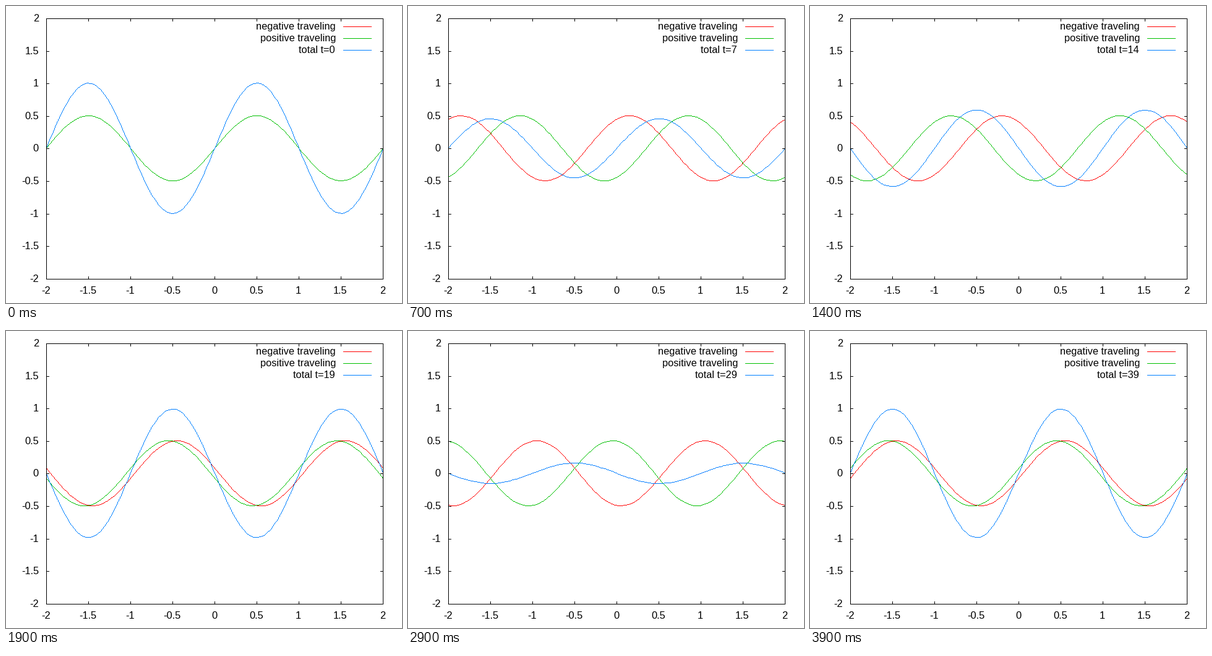
These frames come from a looping animation (640 by 480 pixels, 4000 ms). A matplotlib script:

```python
import numpy as np
import matplotlib.pyplot as plt
from matplotlib.animation import FuncAnimation

W, H, DPI = 640, 480, 100
LEFT, RIGHT, TOP, BOTTOM = 65, 609, 20, 441
RED, GREEN, BLUE = "#ff0000", "#00c000", "#0080ff"
FRAMES, PERIOD = 40, 40

plt.rcParams.update({
    "font.family": "Liberation Sans",
    "font.size": 16.4 * 72 / DPI,
    "text.hinting": "force_autohint",
    "text.hinting_factor": 8,
})

fig = plt.figure(figsize=(W / DPI, H / DPI), dpi=DPI, facecolor="white")
ax = fig.add_axes([0, 0, 1, 1])
ax.set_xlim(0, W)
ax.set_ylim(H, 0)
ax.axis("off")


def col(x):
    return np.floor(LEFT + (x + 2) * (RIGHT - LEFT) / 4 + 0.5)


def row(y):
    return np.ceil(BOTTOM - (y + 2) * (BOTTOM - TOP) / 4 - 0.5)


def stroke(x0, y0, x1, y1, color="black"):
    """One-pixel line from pixel (x0, y0) to pixel (x1, y1)."""
    ax.plot([x0 + 0.5, x1 + 0.5], [y0 + 0.5, y1 + 0.5], color=color,
            lw=72 / DPI, antialiased=False, snap=False,
            solid_capstyle="projecting", zorder=5)


def label(x, y, text, align):
    return ax.text(x, y, text, ha=align, va="baseline", color="black")


def pixel_path(px, py):
    """Pixels of a jagged polyline through whole-pixel points."""
    xs, ys = [], []
    for x0, y0, x1, y1 in zip(px, py, px[1:], py[1:]):
        n = int(max(abs(x1 - x0), abs(y1 - y0))) + 1
        xs.append(np.rint(np.linspace(x0, x1, n)))
        ys.append(np.rint(np.linspace(y0, y1, n)))
    return np.concatenate(xs), np.concatenate(ys)


# Border, ticks and tick labels
for y in (TOP, BOTTOM):
    stroke(LEFT, y, RIGHT, y)
for x in (LEFT, RIGHT):
    stroke(x, TOP, x, BOTTOM)
for v in np.arange(-2, 2.5, 0.5):
    x, y = col(v), row(v)
    stroke(x, TOP, x, TOP + 4)
    stroke(x, BOTTOM - 4, x, BOTTOM)
    stroke(LEFT, y, LEFT + 4, y)
    stroke(RIGHT - 4, y, RIGHT, y)
    label(x - 0.5, 465, f"{v:g}", "center")
    label(53, y + 5, f"{v:g}", "right")

# Key
label(533, 38, "negative traveling", "right")
label(533, 57, "positive traveling", "right")
total_label = label(532, 76, "", "right")
for y, color in ((33, RED), (52, GREEN), (71, BLUE)):
    stroke(545, y, 590, y, color)

# The "," marker fills exactly one pixel
curves = [ax.plot([], [], ",", color=c, antialiased=False, zorder=2 + i)[0]
          for i, c in enumerate((RED, GREEN, BLUE))]
xs = np.linspace(-2, 2, 100)


def draw(t):
    shift = 2 * np.pi * t / PERIOD
    negative = 0.5 * np.sin(np.pi * xs + shift)
    positive = 0.5 * np.sin(np.pi * xs - shift)
    for curve, ys in zip(curves, (negative, positive, negative + positive)):
        curve.set_data(*pixel_path(col(xs), row(ys)))
    total_label.set_text(f"total t={t}")
    return curves + [total_label]


anim = FuncAnimation(fig, draw, frames=FRAMES, interval=100, repeat=True,
                     repeat_delay=0, blit=False)
plt.show()
```
